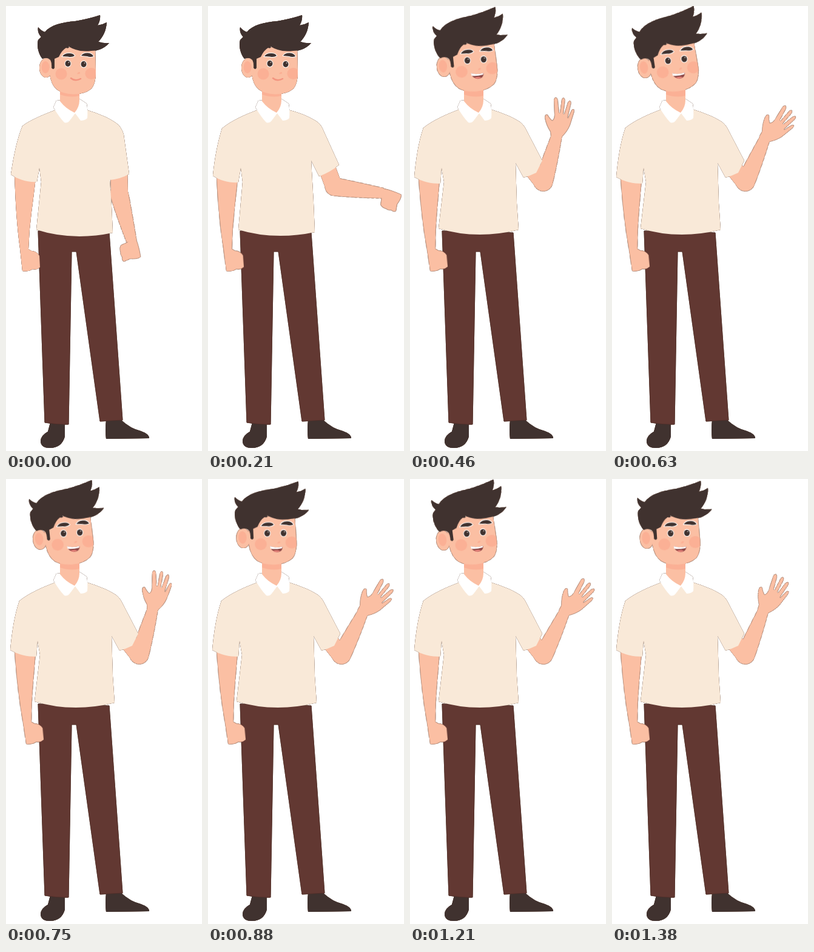
These frames come from a looping animation (323 by 734 pixels, 1.46 s). An HTML page:

```html
<!DOCTYPE html>
<html lang="en">
<head>
<meta charset="utf-8">
<title>Waving man</title>
<style>
  html, body { margin: 0; width: 100%; height: 100%; overflow: hidden; background: #fff; }
  svg { display: block; width: 100vw; height: 100vh; }

  .figure { filter: drop-shadow(0 0 .5px #6b5247) drop-shadow(0 0 .4px #8a7266); }
  .skin { fill: #fbbfa3; }
  .blush { fill: #fbb095; }
  .dark { fill: #40322f; }
  .halo { stroke: #fff; stroke-width: 2; paint-order: stroke; }
  .white { fill: #fff; }
  .trousers { fill: #623832; stroke: #4c2a26; stroke-width: .6; }

  .anim { animation: 1460ms ease-in-out infinite; }
  .head { animation-name: head; transform-origin: 105px 145px; }
  .ear { animation-name: ear; }
  .shirt { animation-name: shirt; fill: #f9e9d8; }
  .upper { animation-name: upper; fill: none; stroke: #fbbfa3; stroke-width: 28; }
  .elbow { animation-name: elbow; }
  .forearm { animation-name: forearm; }
  .wrist { animation-name: wrist; }
  .rest-arm { animation-name: rest; transform-origin: 32px 285px; }
  .before, .after { animation-timing-function: step-end; }
  .before { animation-name: before; }
  .after { animation-name: after; }

  @keyframes before { 0% { opacity: 1 } 22.6%, 100% { opacity: 0 } }
  @keyframes after { 0% { opacity: 0 } 22.6%, 100% { opacity: 1 } }

  @keyframes head {
    0%, 15.5% { transform: translate(0, 0) rotate(0deg) scale(1) }
    31.5% { transform: translate(-2px, -4px) rotate(-6deg) scale(1.035); animation-timing-function: ease-out }
    40% { transform: translate(-2px, -4px) rotate(-8.7deg) scale(1.035) }
    43.15% { transform: translate(-2px, -4px) rotate(-8.5deg) scale(1.035) }
    60.27% { transform: translate(-2px, -4px) rotate(-2.6deg) scale(1.035) }
    73.97% { transform: translate(-2px, -4px) rotate(-6deg) scale(1.035); animation-timing-function: ease-out }
    81% { transform: translate(-2px, -4px) rotate(-7.4deg) scale(1.035) }
    94.52%, 100% { transform: translate(-2px, -4px) rotate(-3.7deg) scale(1.035) }
  }
  @keyframes ear {
    0%, 15.5% { transform: none }
    31.5%, 100% { transform: translate(-2.5px, -1px) }
  }

  @keyframes shirt {
    0%, 2.74% {
      d: path("M80 172C60 180 40 188 27 198C18 220 12 250 8 278C20 286 35 291 51 290L55 267L58 290L50 369Q110 388 176 374L174 330L171 287L171 287Q190 285 203 277L203 277L194 212Q190 198 180 192C165 182 150 177 135 172Z");
      animation-timing-function: ease-in;
    }
    14.38% {
      d: path("M80 172C60 180 40 188 23 202C16 225 11 250 8 280C20 288 35 292 50 291L54 267L57 290L50 369Q110 387 176 373L174 325L170 255L183 281Q202 274 216 262L216 262L191 207Q187 196 180 191C165 181 150 176 135 172Z");
      animation-timing-function: ease-out;
    }
    28.77%, 100% {
      d: path("M80 171C60 179 40 187 22 201C14 225 10 250 7 282C20 290 35 293 50 293L52 267L56 290L47 367Q110 386 179 369L176 325L174 259L187 283Q198 280 208 275L218 255L193 207Q188 196 181 191C165 181 150 176 135 171Z");
    }
  }

  @keyframes upper {
    0%, 2.74% { d: path("M186 270L187 308"); animation-timing-function: ease-in }
    14.38% { d: path("M194 262L207 297"); animation-timing-function: ease-out }
    28.77%, 100% { d: path("M196 262L219 291") }
  }
  @keyframes elbow {
    0%, 2.74% { transform: translate(187px, 308px); animation-timing-function: ease-in }
    14.38% { transform: translate(207px, 297px); animation-timing-function: ease-out }
    28.77%, 100% { transform: translate(219px, 291px) }
  }
  @keyframes forearm {
    0%, 2.74% { transform: rotate(166deg); animation-timing-function: ease-in }
    14.38% { transform: rotate(99deg); animation-timing-function: ease-out }
    28.77% { transform: rotate(14deg) }
    31.5% { transform: rotate(16.5deg) }
    39% { transform: rotate(28deg) }
    43.15% { transform: rotate(24.5deg); animation-timing-function: ease-out }
    49.66% { transform: rotate(16deg) }
    60.27% { transform: rotate(27deg) }
    70.9% { transform: rotate(17deg); animation-timing-function: ease-in }
    73.97% { transform: rotate(18deg); animation-timing-function: ease-out }
    81.5% { transform: rotate(27deg) }
    90% { transform: rotate(17deg); animation-timing-function: ease-in }
    94.52%, 100% { transform: rotate(22.3deg) }
  }
  @keyframes wrist {
    0%, 2.74% { transform: rotate(-11deg) }
    14.38% { transform: rotate(0deg) }
    28.77% { transform: rotate(-12deg) }
    31.5% { transform: rotate(-17deg) }
    40% { transform: rotate(8deg) }
    43.15% { transform: rotate(9deg) }
    50.5% { transform: rotate(-14deg) }
    60.27% { transform: rotate(5deg) }
    70.9% { transform: rotate(-12deg); animation-timing-function: ease-in }
    73.97% { transform: rotate(-7deg); animation-timing-function: ease-out }
    82% { transform: rotate(5deg) }
    90% { transform: rotate(-12deg); animation-timing-function: ease-in }
    94.52%, 100% { transform: rotate(-2.3deg) }
  }
  @keyframes rest {
    0%, 2.74% { transform: none }
    14.38% { transform: rotate(-1.2deg) }
    28.77%, 100% { transform: rotate(-2.4deg) }
  }
</style>
</head>
<body>
<svg viewBox="0 0 323 734" preserveAspectRatio="none">
  <g class="figure">
    <!-- legs -->
    <path class="dark" d="M73 687L97 688L97 710Q92 729 72 729Q57 729 57 717Q58 708 69 702Z"/>
    <path class="dark" d="M165 683L190 683Q205 697 222 701Q236 706 236 713L165 714Q163 700 165 683Z"/>
    <path class="trousers" d="M53 371L64 687Q84 691 103 690L108 405L116 405L155 685L192 683L170 374Z"/>

    <!-- resting arm -->
    <path class="anim rest-arm skin" d="M14 275L50 275Q46 310 42 340Q38 370 37 401L42 404Q50 404 55 412L56 431Q50 436 44 434Q36 439 27 437L23 400Q16 350 14 275Z"/>

    <!-- waving arm -->
    <path class="anim upper" d="M186 270L187 308"/>
    <g class="anim elbow"><g class="anim forearm">
      <path class="skin" d="M-14 -6Q-12 -40 -8.5 -82L8.5 -82Q14 -40 16 -2A16 16 0 0 1 -14 6Z"/>
      <g transform="translate(0 -80)"><g class="anim wrist">
        <path class="anim before skin" transform="rotate(-99)" d="M-3 -9L12 -5Q24 -1 32 3Q33 8 25 19L23 30Q19 32 15 28Q11 29 7 26Q0 24 -2 19L0 7Z"/>
        <path class="anim after skin" d="M-9 3L-10 -7Q-17 -18 -19 -30Q-19 -36 -15 -35Q-11 -28 -7 -25Q-3 -28 -3 -35L-4 -60Q-1 -67 2 -60L4 -38L6 -38L9 -60Q12 -66 14 -59L11 -36L13 -36L19 -55Q23 -61 24 -54L18 -30L19 -29L25 -42Q29 -47 29 -40L22 -18Q18 -8 9 1L6 6Z"/>
      </g></g>
    </g></g>

    <!-- torso -->
    <path class="anim shirt" d="M80 172L27 198L8 278L51 290L50 369L176 374L171 287L203 277L180 192L135 172Z"/>
    <path class="white" d="M83 156L78 167Q88 184 96 192Q101 194 105 189L114 177L123 189Q130 189 134 185Q135 172 133 161L121 153Z"/>
    <path class="skin" d="M89 136L89 157Q98 169 113 176Q121 167 121 155L121 136Z"/>
    <path class="blush" d="M89 138L121 138L121 148Q106 152 89 146Z"/>

    <!-- head -->
    <g class="anim head">
      <path class="skin" d="M72 70L72 112Q74 130 84 138Q94 145 110 145.500Q129 146 140 137Q148 129 148 108L147 66Z"/>
      <g class="anim ear">
        <ellipse class="skin" cx="66" cy="102" rx="11" ry="16"/>
        <ellipse class="blush" cx="65" cy="101" rx="6.5" ry="10"/>
      </g>
      <circle class="blush" cx="91" cy="112" r="9.5"/>
      <path class="blush" d="M147.700 105A10 9.500 0 1 0 147.700 118Z"/>
      <path class="dark halo" d="M93 83Q96 78 104 78Q111 78 113 82Q109 85 102 83.500Z"/>
      <path class="dark halo" d="M124 82Q127 77 135 77.500Q142 78 144 83Q139 85 134 83Z"/>
      <path class="dark" d="M60 87C54 80 50 66 53 56L58 51C53 46 52 40 53 35Q58 41 64 43C74 31 92 27 114 25C133 22 145 18 155 15Q156 23 151 32Q159 31 166 27C165 41 160 51 152 59Q162 62 170 61C161 71 151 74 140 74C124 76 110 72 103 66Q105 71 99 69Q92 73 87 84L80 87L80 102Q78 106 75 102Q76 88 69 86Q64 85 60 87Z"/>
      <g class="dark halo">
        <ellipse cx="102" cy="95" rx="4.500" ry="5"/>
        <ellipse cx="128" cy="96" rx="4.500" ry="5"/>
      </g>
      <g class="white">
        <circle cx="103.500" cy="93" r=".8"/>
        <circle cx="129.500" cy="94" r=".8"/>
      </g>
      <path class="blush" d="M117 112Q119 108 122 109Q123 113 117 112Z"/>
      <path class="anim before" d="M107 119Q114 125 123 120" fill="none" stroke="#f39580" stroke-width="2.500" stroke-linecap="round"/>
      <g class="anim after"><g transform="translate(-1 1) rotate(8 116 120)">
        <path d="M106 116Q116 119 126 115Q127 124 117 125Q108 124 106 116Z" fill="#8a4543"/>
        <path class="white" d="M106 116Q116 119 126 115L125 118Q116 121 107 120Z"/>
        <path d="M111 123.500Q117 120 123 122.500Q118 126 111 123.500Z" fill="#e58078"/>
      </g></g>
    </g>
  </g>
</svg>
</body>
</html>
```
